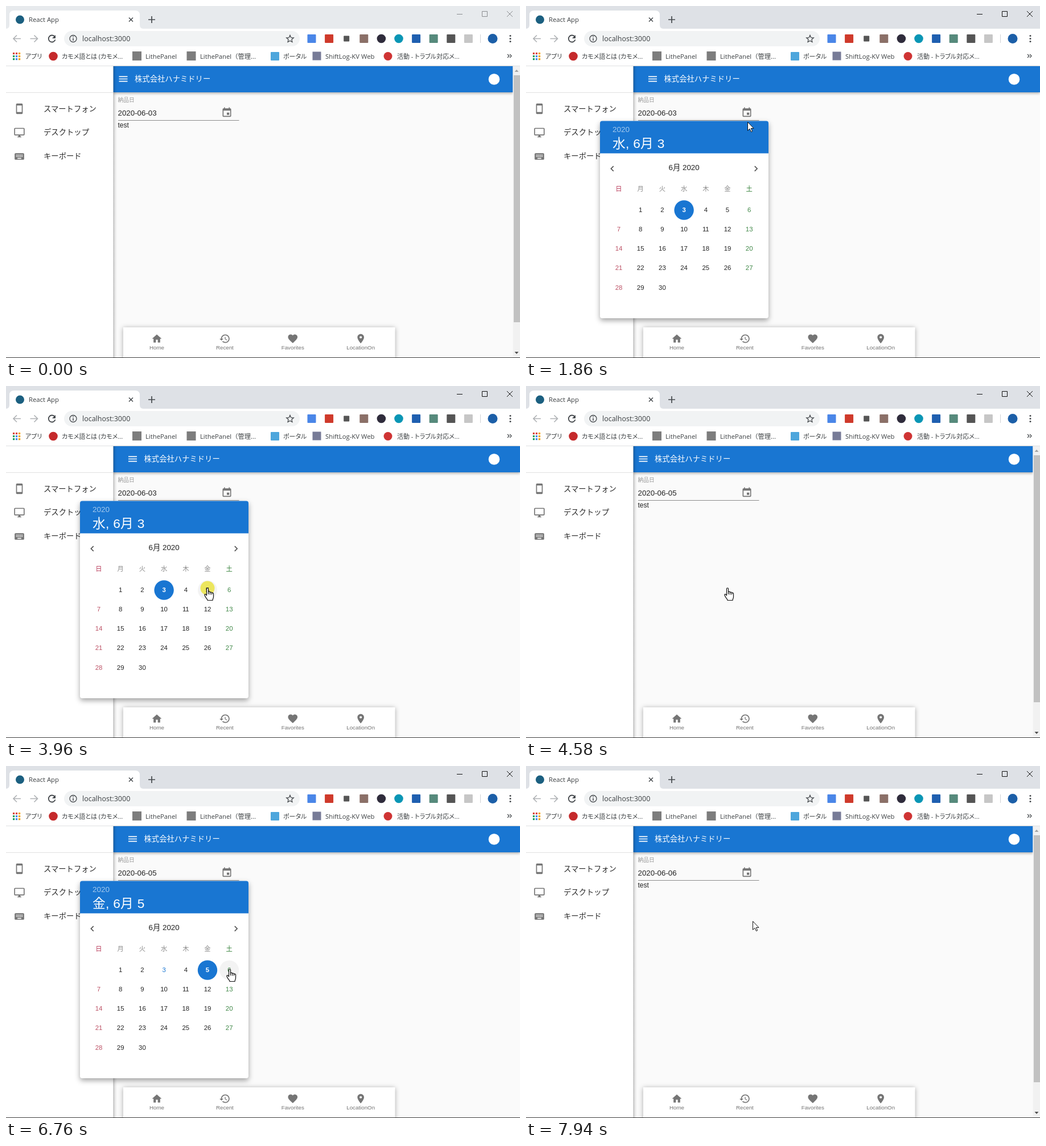
An HTML page that plays this animation: 903 by 620 pixels, repeating every 8 s.

```html
<!DOCTYPE html>
<html lang="ja">
<head>
<meta charset="utf-8">
<title>Date picker demo</title>
<style>
  html, body { margin: 0; width: 100%; height: 100%; overflow: hidden; background: #fff; }
  svg { display: block; width: 903px; height: 620px; }
  text { font-family: "Liberation Sans", "Noto Sans CJK JP", "Noto Sans CJK", sans-serif; white-space: pre; }
  .ui { font: 11.3px "Open Sans", "Noto Sans CJK JP", "Noto Sans CJK", sans-serif; fill: #3c4043; }
  .kana { font-size: 11px; font-feature-settings: "palt"; }
  .jp { font: 13.33px "Noto Sans CJK JP", "Noto Sans CJK", sans-serif; }
  .mid { text-anchor: middle; }
  .line { fill: none; stroke-width: 1; }
  #bar { filter: drop-shadow(0 2px 2px rgba(0,0,0,.3)); }
  #nav { filter: drop-shadow(0 1px 4px rgba(0,0,0,.32)); }
  #card { filter: drop-shadow(0 4px 5px rgba(0,0,0,.36)); }
  #press { mix-blend-mode: multiply; }
</style>
</head>
<body>
<svg id="stage" viewBox="0 0 903 620" xmlns="http://www.w3.org/2000/svg"></svg>
<script>
const BLUE = '#1976d2', GREY = '#757575';

// --- markup helpers ---
const rect = (x, y, w, h, fill, more = '') =>
  `<rect x="${x}" y="${y}" width="${w}" height="${h}" fill="${fill}" ${more}/>`;
const dot = (x, y, r, fill, more = '') =>
  `<circle cx="${x}" cy="${y}" r="${r}" fill="${fill}" ${more}/>`;
const text = (x, y, str, cls = '', more = '') =>
  `<text x="${x}" y="${y}" class="${cls}" ${more}>${str}</text>`;
const line = (d, color, more = '') =>
  `<path class="line" d="${d}" stroke="${color}" ${more}/>`;
// 24-unit icon centred on a point
const icon = (x, y, body, fill = GREY) =>
  `<g transform="translate(${x - 10} ${y - 10}) scale(.8333)" fill="${fill}">${body}</g>`;
const path = d => `<path d="${d}"/>`;

const ICONS = {
  phone: path('M17 1H7c-1.1 0-2 .9-2 2v18c0 1.1.9 2 2 2h10c1.1 0 2-.9 2-2V3c0-1.1-.9-2-2-2zm0 18H7V5h10z'),
  desktop: path('M21 2H3c-1.1 0-2 .9-2 2v12c0 1.1.9 2 2 2h7v2H8v2h8v-2h-2v-2h7c1.1 0 2-.9 2-2V4c0-1.1-.9-2-2-2zm0 14H3V4h18z'),
  keyboard: rect(2, 5, 20, 14, GREY, 'rx="2"') +
    line('M5 9h14M5 12h14', '#fff', 'style="stroke-width:2" stroke-dasharray="2 1"') +
    line('M8 16h8', '#fff', 'style="stroke-width:2"'),
  menu: path('M3 18h18v-2H3zm0-5h18v-2H3zm0-7v2h18V6z'),
  event: path('M17 12h-5v5h5zM16 1v2H8V1H6v2H5c-1.1 0-2 .9-2 2v14c0 1.1.9 2 2 2h14c1.1 0 2-.9 2-2V5c0-1.1-.9-2-2-2h-1V1zm3 18H5V8h14z'),
  home: path('M10 20v-6h4v6h5v-8h3L12 3 2 12h3v8z'),
  recent: path('M13 3c-4.97 0-9 4.03-9 9H1l3.9 3.9.1.1L9 12H6c0-3.87 3.13-7 7-7s7 3.13 7 7-3.13 7-7 7c-1.93 0-3.68-.79-4.94-2.06l-1.42 1.42C8.27 20 10.51 21 13 21c4.97 0 9-4.03 9-9s-4.03-9-9-9zm-1 5v5l4.28 2.54.72-1.21-3.5-2.08V8z'),
  heart: path('M12 21.35l-1.45-1.32C5.4 15.36 2 12.28 2 8.5 2 5.42 4.42 3 7.5 3c1.74 0 3.41.81 4.5 2.09C13.09 3.81 14.76 3 16.5 3 19.58 3 22 5.42 22 8.5c0 3.78-3.4 6.86-8.55 11.54z'),
  pin: path('M12 2C8.13 2 5 5.13 5 9c0 5.25 7 13 7 13s7-7.75 7-13c0-3.87-3.13-7-7-7zm0 9.5a2.5 2.5 0 010-5 2.5 2.5 0 010 5z'),
  prev: path('M15.4 16.6L10.8 12l4.6-4.6L14 6l-6 6 6 6z'),
  next: path('M8.6 16.6l4.6-4.6-4.6-4.6L10 6l6 6-6 6z')
};

// --- browser window ---
function browser() {
  const ext = [['#4a86e8', 0], ['#cf3a2b', 0], ['#555', 0], ['#8b7068', 0], ['#2f2c3c', 1],
               ['#0a96b5', 1], ['#1f5fb0', 0], ['#568a7c', 0], ['#555', 0], ['#c6c6c6', 0]];
  const extensions = ext.map(([c, round], i) => {
    const x = 537 + i * 30.6, r = i === 2 ? 5 : 7.5;
    return round ? dot(x, 57.5, 7.8, c) : rect(x - r, 57.5 - r, 2 * r, 2 * r, c, 'rx="1"');
  }).join('');
  const appColors = ['#db4437', '#db4437', '#f4a000', '#0f9d58', '#4285f4', '#f4a000', '#0f9d58', '#4285f4', '#f4a000'];
  const apps = appColors.map((c, i) =>
    rect(12 + i % 3 * 5, 82 + Math.floor(i / 3) * 5, 3.2, 3.2, c)).join('');
  return rect(0, 0, 903, 40, '#e7eaed', 'id="strip"') +
    '<path fill="#fff" d="M0 40q6 0 6-7V16q0-8 8-8h213q8 0 8 8v17q0 7 6 7z"/>' +
    rect(0, 40, 903, 66, '#fff') + rect(0, 105, 903, 1, '#dfe0e2') +
    dot(24.5, 24, 7.5, '#1b5f80') + text(40, 28.3, 'React App', 'ui') +
    line('M216 20.5l7 7m0-7l-7 7', '#45494d', 'style="stroke-width:1.5"') +
    line('M250 24h12m-6-6v12', '#45494d', 'style="stroke-width:1.7"') +
    line('M792 14.5h10M836.5 9.5h9v9h-9zM880 9l10 10m0-10l-10 10', '#8b8d90', 'id="controls"') +
    line('M26 57.5H13m6-6l-6 6 6 6M42.500 57.500h13m-6-6l6 6-6 6', '#aeb1b4', 'style="stroke-width:1.6"') +
    line('M85.500 53.800a6 6 0 101 5.500', '#45494d', 'style="stroke-width:1.8"') +
    '<path fill="#45494d" d="M87 51v6h-6z"/>' +
    rect(102, 44, 414, 27, '#f1f3f4', 'rx="13.5"') +
    line('M118 56.500v4.500m0-7.500v1.500', '#45494d', 'style="stroke-width:1.5"') +
    dot(118, 57.5, 6, 'none', 'stroke="#45494d" stroke-width="1.3"') +
    text(134, 62, 'localhost:3000', 'ui', 'style="font-size:12.5px"') +
    line('M499 51.500l1.800 4.200 4.500.4-3.400 3 1 4.400-3.900-2.300-3.900 2.300 1-4.400-3.400-3 4.500-.4z', '#45494d', 'style="stroke-width:1.3"') +
    extensions + rect(833, 50, 1, 15, '#d0d2d5') + dot(855, 57.5, 8.5, '#1c5fa8') +
    [52.5, 57.5, 62.5].map(y => dot(886, y, 1.5, '#45494d')).join('') +
    apps + text(34, 92.5, 'アプリ', 'ui kana') +
    dot(83, 88.5, 7.8, '#c52a2c') + text(98, 92.5, 'カモメ語とは (カモメ...', 'ui kana') +
    rect(222, 80, 16, 16, '#7d7d7d') + text(245, 92.5, 'LithePanel', 'ui') +
    rect(317.5, 80, 16, 16, '#7d7d7d') + text(341, 92.5, 'LithePanel（管理...', 'ui') +
    rect(465, 81, 15, 15, '#4ea6dc', 'rx="1"') + text(487, 92.5, 'ポータル', 'ui kana') +
    rect(538.5, 80.5, 15, 15, '#777b97') + text(561, 92.5, 'ShiftLog-KV Web', 'ui') +
    dot(671, 88.5, 7.5, '#cf3434') + text(687, 92.5, '活動 - トラブル対応メ...', 'ui kana') +
    line('M881 85l3 3-3 3m4-6l3 3-3 3', '#45494d', 'style="stroke-width:1.3"');
}

// --- web page ---
function page() {
  const links = [['phone', 'スマートフォン'], ['desktop', 'デスクトップ'], ['keyboard', 'キーボード']];
  const tabs = [['home', 'Home'], ['recent', 'Recent'], ['heart', 'Favorites'], ['pin', 'LocationOn']];
  return rect(188, 106, 715, 514, '#fafafa') +
    text(196.5, 168.5, '納品日', 'jp', 'fill="#9a9a9a" style="font-size:9.8px"') +
    dot(388, 188.5, 21.5, '#000', 'id="glow"') +
    text(196.5, 192.5, '', '', 'id="date" fill="#222" font-size="13.33"') +
    icon(388, 187.7, ICONS.event) +
    rect(197, 201, 212.5, 1, '#8c8c8c') + rect(197, 200, 212.5, 2, '#111', 'id="under"') +
    text(196.5, 213.7, 'test', '', 'fill="#222" font-size="12"') +
    rect(188, 106, 715, 46, BLUE, 'id="bar"') +
    `<g id="title">${icon(206, 128.5, ICONS.menu, '#fff')}` +
    text(226, 132.7, '株式会社ハナミドリー', 'jp', 'fill="#fff" font-weight="500" style="font-weight:500"') + '</g>' +
    dot(857.5, 129, 9.8, '#fff') +
    rect(188, 106, 7, 514, 'url(#edge)') +
    rect(0, 106, 188.5, 514, '#fff') + rect(0, 152, 188.5, 1, '#e0e0e0') +
    links.map(([name, label], i) =>
      icon(23.5, 181 + i * 42, ICONS[name]) +
      text(66, 185.5 + i * 41.7, label, 'jp', 'fill="#2b2b2b"')).join('') +
    rect(206, 566, 477.5, 60, '#fff', 'id="nav"') +
    tabs.map(([name, label], i) =>
      icon(265 + i * 119.4, 586, ICONS[name]) +
      text(265 + i * 119.4, 605, label, 'mid', `fill="${GREY}" font-size="9.75"`)).join('') +
    '<g id="scroll">' + rect(890.5, 106, 12.5, 514, '#f1f1f1') + rect(892, 122, 11, 435, '#c1c1c1') +
    '<path fill="#a3a3a3" d="M893.500 116h7l-3.500-4z"/><path fill="#505050" d="M893.500 609h7l-3.500 4z"/></g>' +
    rect(0, 619, 903, 1, '#3a3a3a');
}

// --- calendar ---
const dayPos = d => ({ x: 163 + d % 7 * 38.2, y: 359 + Math.floor(d / 7) * 34.25 });

function calendar() {
  const heads = [...'日月火水木金土'].map((c, i) =>
    text(163 + i * 38.2, 326, c, 'mid jp',
      `fill="${['#b83a5a', '#8c8c8c', '#2e7d32'][i === 0 ? 0 : i === 6 ? 2 : 1]}" style="font-size:11.3px"`)).join('');
  let days = '';
  for (let d = 1; d <= 30; d++) {
    const p = dayPos(d);
    days += text(p.x, p.y + 3.7, d, 'mid', `id="d${d}" font-size="11.4"`);
  }
  return '<g id="pop"><g id="card">' + rect(130, 202.5, 296, 347.5, '#fff', 'rx="4"') + '</g>' +
    `<path fill="${BLUE}" d="M130 259.500V206.500q0-4 4-4h288q4 0 4 4v53z"/>` +
    text(152, 221.5, '2020', '', 'fill="#fff" fill-opacity=".6" font-size="13.5"') +
    text(152, 250, '', '', 'id="head" fill="#fff" font-size="22.7" letter-spacing=".3"') +
    icon(151.5, 286.5, ICONS.prev, '#555') + icon(404, 286.5, ICONS.next, '#555') +
    text(277.6, 289.3, '6月 2020', 'mid', 'fill="#222" font-size="13.33"') +
    heads + dot(0, 0, 17, '#f3f3f3', 'id="hover"') + dot(0, 0, 17.2, BLUE, 'id="chosen"') + days + '</g>';
}

const pointer = dot(0, 0, 12.5, '#f8f262', 'id="press"') +
  '<g id="arrow" fill="#fff" stroke="#111"><path d="M.5 .5V15.500L4 12.300 6.500 17.700 8.700 16.700 6.300 11.500H11z"/></g>' +
  '<g id="hand" fill="#fff" stroke="#111" stroke-width="1.2" stroke-linejoin="round">' +
  '<path d="M-1.500 13V1.300C-1.500-.7 1.500-.7 1.500 1.300V7C2 5.700 4.500 6 4.500 7.500 5.300 6.600 7.500 7 7.500 8.500 8.400 7.800 10.500 8.300 10.500 10V15.500C10.500 18 9 19 9 21.500H0C0 19.500-2 18.500-3.500 15.500-4.500 13.500-6 12-4.800 11-3.700 10.200-2.500 11.300-1.500 13z"/>' +
  '<path d="M1.500 7v4M4.500 7.500v4M7.500 8.500v3"/></g>';

document.getElementById('stage').innerHTML =
  '<defs><linearGradient id="edge"><stop stop-color="#000" stop-opacity=".34"/>' +
  '<stop offset=".4" stop-color="#000" stop-opacity=".1"/><stop offset="1" stop-color="#000" stop-opacity="0"/></linearGradient></defs>' +
  browser() + page() + calendar() + pointer;

// --- timeline ---
const LOOP = 8000, GROW = 320, SHRINK = 280, FOCUS = 1380;
const MOVES = [ // time, x, y
  [0, 769, 625], [840, 416, 240], [1220, 391, 199], [1820, 391, 199], [2160, 344, 332],
  [2240, 344, 332], [2780, 326, 359], [2960, 326, 359], [3020, 320, 358], [3300, 320, 358],
  [3480, 354, 356], [4680, 354, 356], [5520, 387, 192], [6260, 387, 192], [6740, 393, 358],
  [7780, 393, 358], [7940, 398, 273]
];
const PRESSES = [[1380, 1520], [3960, 4120], [5840, 5980], [7000, 7130]];
const HANDS = [[1120, 1860], [2600, 4740], [5360, 6320], [6640, 7860]];
const OPENS = [[1540, 4120], [5990, 7130]];
const HOVERS = [[1100, 1540], [5340, 5990]];

const within = (spans, t) => spans.find(([a, b]) => t >= a && t < b);
const clamp = v => Math.max(0, Math.min(1, v));
const ease = v => { const p = clamp(v); return p * p * (3 - 2 * p); };

function pointerAt(t) {
  let i = 1;
  while (i < MOVES.length - 1 && t > MOVES[i][0]) i++;
  const [t0, x0, y0] = MOVES[i - 1], [t1, x1, y1] = MOVES[i];
  const k = ease((t - t0) / (t1 - t0));
  return { x: x0 + (x1 - x0) * k, y: y0 + (y1 - y0) * k };
}

const el = id => document.getElementById(id);
const set = (id, attrs) => { for (const k in attrs) el(id).setAttribute(k, attrs[k]); };
const show = (id, on) => set(id, { display: on ? 'inline' : 'none' });

function dayColor(d, chosen) {
  if (d === chosen) return '#fff';
  if (d === 3) return BLUE;
  return d % 7 === 0 ? '#bc5266' : d % 7 === 6 ? '#3f8746' : '#222';
}

function drawCalendar(t, span, day, p, hand) {
  const grown = ease((t - span[0]) / GROW);
  const gone = ease((t - span[1]) / SHRINK);
  const size = Math.min(grown, 1 - ease((t - span[1] - SHRINK / 3) / SHRINK));
  set('pop', {
    opacity: grown * (1 - gone),
    transform: `translate(278 202.5) scale(${.75 + .25 * size} ${.5625 + .4375 * size}) translate(-278 -202.5)`
  });
  el('head').textContent = `${'日月火水木金土'[day % 7]}, 6月 ${day}`;
  const c = dayPos(day);
  set('chosen', { cx: c.x, cy: c.y + .5 });
  let near = 0;
  for (let d = 1; d <= 30; d++) {
    const q = dayPos(d);
    if (Math.hypot(q.x - p.x, q.y - p.y) < 17) near = d;
    set('d' + d, { fill: dayColor(d, day), 'font-weight': d === day ? 700 : 400 });
  }
  show('hover', near && hand);
  if (near) set('hover', { cx: dayPos(near).x, cy: dayPos(near).y + .5 });
}

function draw(t) {
  const p = pointerAt(t);
  const hand = !!within(HANDS, t);
  const open = OPENS.find(([a, b]) => t >= a && t < b + SHRINK);
  const day = t < OPENS[0][1] ? 3 : t < OPENS[1][1] ? 5 : 6;

  set('strip', { fill: t < FOCUS ? '#e7eaed' : '#dee1e6' });
  set('controls', { stroke: t < FOCUS ? '#8b8d90' : '#111' });
  set('bar', { width: open ? 715 : 702.5 });
  set('title', { transform: `translate(${open ? 16.5 : 0} 0)` });
  show('scroll', !open);
  el('date').textContent = `2020-06-0${day}`;

  const over = within(HOVERS, t);
  const lit = over ? clamp((t - over[0]) / 100) : 0;
  set('under', { opacity: lit });
  set('glow', { opacity: lit * .04 });

  show('pop', open);
  if (open) drawCalendar(t, open, day, p, hand);

  show('press', within(PRESSES, t));
  set('press', { cx: p.x, cy: p.y });
  show('hand', hand);
  show('arrow', !hand);
  const place = { transform: `translate(${Math.round(p.x)} ${Math.round(p.y)})` };
  set('hand', place);
  set('arrow', place);
}

const start = performance.now();
function tick() {
  draw((performance.now() - start) % LOOP);
  requestAnimationFrame(tick);
}
tick();
</script>
</body>
</html>
```
